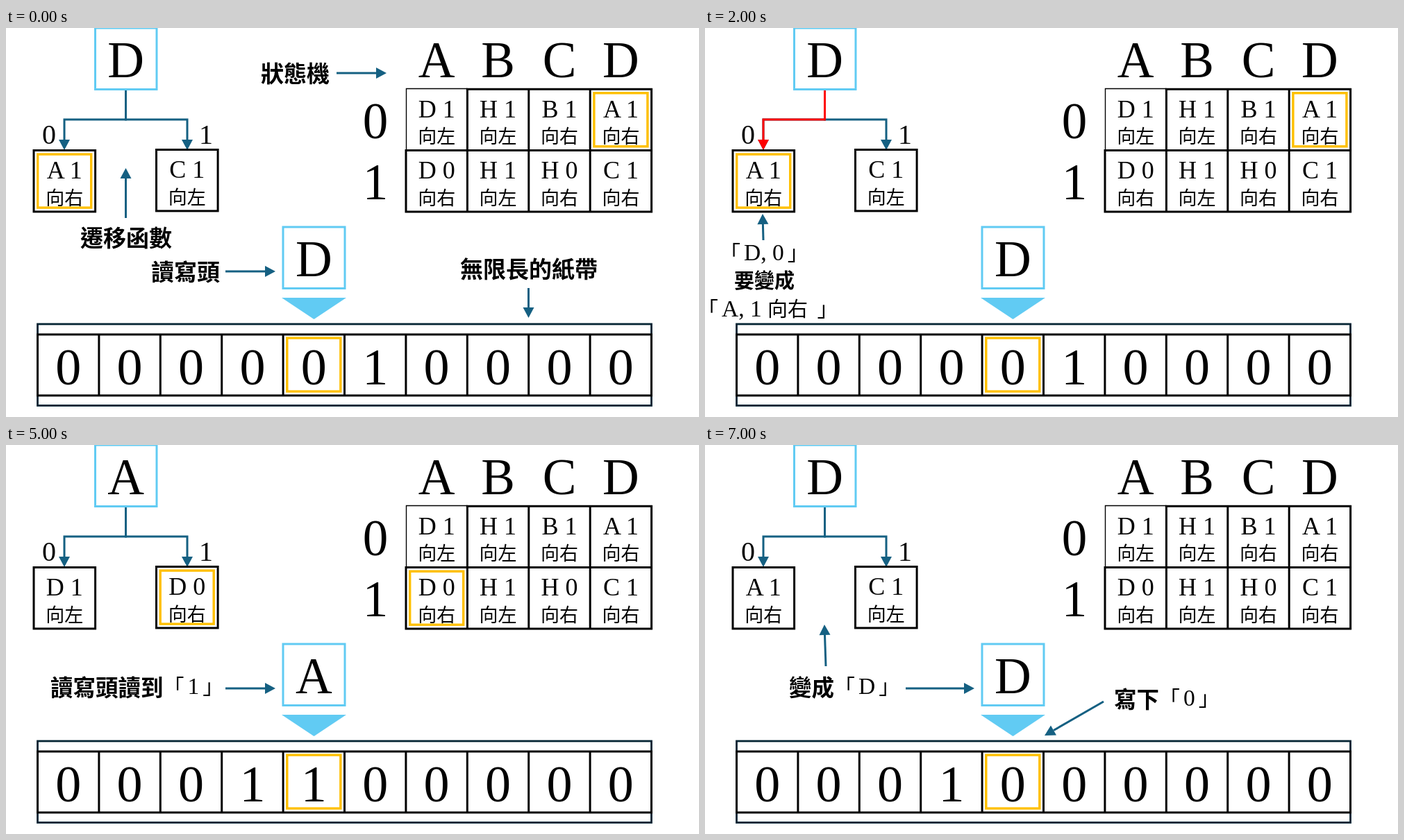
An HTML page that plays this animation: 998x561 px, repeating every 8 s.

```html
<!DOCTYPE html>
<html lang="zh-Hant">
<head>
<meta charset="utf-8">
<style>
  html, body { margin: 0; height: 100%; overflow: hidden; background: #fff; }
  svg { display: block; width: 998px; height: 561px; }
  text {
    font-family: 'Liberation Serif', 'Noto Sans CJK TC', 'Noto Sans CJK', serif;
    white-space: pre;
    text-spacing-trim: space-all;
  }
  .hand { font-family: 'Noto Sans CJK TC', 'Noto Sans CJK', sans-serif; font-weight: 700; }
  .light { font-family: 'Noto Sans CJK TC', 'Noto Sans CJK', sans-serif; font-weight: 300; }
</style>
</head>
<body>
<svg id="stage" viewBox="0 0 998 561"></svg>
<script>
const TEAL = '#156082', SKY = '#61cbf3', GOLD = '#ffc000', RED = '#f00', NAVY = '#042433';
const CELL = 88.4, TABLE_X = 576, TABLE_Y = 88.2, TAPE_X = 45.5;

const text = (x, y, size, s, anchor = 'middle') =>
  `<text x="${x}" y="${y}" font-size="${size}" text-anchor="${anchor}">${s}</text>`;
const light = (s, size, dx = 0) => `<tspan class="light" font-size="${size}" dx="${dx}">${s}</tspan>`;
const hand = (x, midY, s, size = 33) =>
  `<text class="hand" x="${x}" y="${midY + size * 0.38}" font-size="${size}">${s}</text>`;
const box = (x, y, w, h, color, width = 3) =>
  `<rect x="${x}" y="${y}" width="${w}" height="${h}" fill="none" stroke="${color}" stroke-width="${width}"/>`;
const path = (d, color = '#000', width = 3) =>
  `<path d="${d}" fill="none" stroke="${color}" stroke-width="${width}"/>`;
const gold = (x, y) => box(x + 5.7, y + 5.6, 77, 77, GOLD, 3.4);

// Polyline through [x, y] points, ending in a solid arrowhead.
function arrow(points, color = TEAL) {
  const [[px, py], [x, y]] = points.slice(-2);
  const len = Math.hypot(x - px, y - py), ux = (x - px) / len, uy = (y - py) / len;
  const bx = x - ux * 15, by = y - uy * 15;
  const shaft = [...points.slice(0, -1), [bx, by]];
  return path('M' + shaft.join('L'), color) +
    `<path d="M${x} ${y}L${bx - uy * 8} ${by + ux * 8}L${bx + uy * 8} ${by - ux * 8}z" fill="${color}"/>`;
}

const rule = (x, y, symbols, move) =>
  text(x + 44.2, y + 40.6, 36, symbols) + text(x + 44.2, y + 78, 27, light(move, 27));

// Text in corner brackets; brackets and Chinese are set smaller than Latin.
const quoted = (x, y, s, move = '') => text(x, y, 33.5,
  light('「', 30) + `<tspan dx="5">${s}</tspan>` + (move && ` ${light(move, 29)} `) + light('」', 30, 5), 'start');
const phrase = (x, midY, words, s) =>
  hand(x, midY, words, 32.5) + quoted(x + words.length * 32.5, midY + 9, s);

function table() {
  const rows = [
    [['D 1', '向左'], ['H 1', '向左'], ['B 1', '向右'], ['A 1', '向右']],
    [['D 0', '向右'], ['H 1', '向左'], ['H 0', '向右'], ['C 1', '向右']]
  ];
  const right = TABLE_X + 4 * CELL, bottom = TABLE_Y + 2 * CELL, mid = TABLE_Y + CELL;
  let out = [...'ABCD'].map((c, i) => text(TABLE_X + CELL * (i + 0.5), 71, 73, c)).join('');
  rows.forEach((row, r) => {
    out += text(532, 159 + r * CELL, 73, r);
    row.forEach((cell, c) => out += rule(TABLE_X + c * CELL, TABLE_Y + r * CELL, ...cell));
  });
  out += path(`M${TABLE_X + 0.5} ${mid}V87.5H${TABLE_X + CELL}`, '#000', 1.4);
  out += path(`M${TABLE_X + CELL - 1.5} ${TABLE_Y}H${right}V${bottom}H${TABLE_X}V${mid}H${right}`);
  for (let c = 1; c < 4; c++) out += path(`M${TABLE_X + c * CELL} ${TABLE_Y}V${bottom}`);
  return out;
}

const leaf = i => [40 + i * 176.5, 176.5 - i];

function tree(state, red) {
  const rules = state === 'D'
    ? [['A 1', '向右'], ['C 1', '向左']]
    : [['D 1', '向左'], ['D 0', '向右']];
  const branch = (i, color) =>
    arrow([[172.5, 89], [172.5, 132], [84 + i * 177, 132], [84 + i * 177, 176]], color);
  return branch(0) + branch(1) + (red === undefined ? '' : branch(red, RED)) +
    box(128.5, 0, 88.5, 88.5, SKY) + text(172.5, 71, 73, state) +
    text(62, 167, 40, 0) + text(288, 167, 40, 1) +
    rules.map((r, i) => box(...leaf(i), 88.6, 88.4, '#000') + rule(...leaf(i), ...r)).join('');
}

function tape(digits) {
  let out = box(TAPE_X, 427, 10 * CELL, 117.5, NAVY, 2.8) + box(TAPE_X, 442, 10 * CELL, 88, '#000');
  [...digits].forEach((d, i) => {
    const x = TAPE_X + i * CELL;
    out += text(x + CELL / 2, 513.5, 74, d);
    if (i) out += path(`M${x} 442V530`);
  });
  return out;
}

const head = state => box(399, 287, 89, 88.5, SKY) + text(443.3, 358, 73, state) +
  `<path d="M397 389H490L443.5 420z" fill="${SKY}"/>`;

const headArrow = (from = 316) => arrow([[from, 351], [388, 351]]);

const labels = hand(367, 65, '狀態機') + arrow([[476, 65], [548, 65]]) +
  hand(107, 302, '遷移函數') + arrow([[172.5, 274], [172.5, 202]]) +
  hand(209, 351, '讀寫頭') + headArrow() +
  hand(654, 347, '無限長的紙帶') + arrow([[752.5, 375], [752.5, 418]]);

const becomes = (dx, dy, now, next) =>
  arrow([[84 + dx, 306 + dy], [83 + dx, 268 + dy]]) +
  quoted(21 + dx, 335 + dy, now) + hand(42 + dx, 364 + dy, '要變成', 29) +
  quoted(-11 + dx, 416 + dy, next, '向右');

const written = (state, digit) =>
  phrase(121, 350, '變成', state) + arrow([[174, 319], [172, 259]]) + headArrow(289) +
  phrase(589, 367, '寫下', digit) + arrow([[574, 370], [489, 419]]);

const shifted = hand(142, 350, '讀寫頭向右') + headArrow() + arrow([[486, 434], [311, 434]], RED);

const tapeGold = gold(TAPE_X + 4 * CELL, 441.5);
const goldD0 = tapeGold + gold(...leaf(0)) + gold(TABLE_X + 3 * CELL, TABLE_Y);
const goldA1 = tapeGold + gold(...leaf(1)) + gold(TABLE_X, TABLE_Y + CELL);

const scene = (state, digits, extra, red) =>
  table() + tree(state, red) + tape(digits) + head(state) + extra;

// One scene per second.
const scenes = [
  scene('D', '0000010000', goldD0 + labels),
  scene('D', '0000010000', goldD0 + phrase(96, 350, '讀寫頭讀', '0') + headArrow()),
  scene('D', '0000010000', goldD0 + becomes(0, 0, 'D, 0', 'A, 1'), 0),
  scene('A', '0000110000', tapeGold + written('A', '1')),
  scene('A', '0001100000', shifted),
  scene('A', '0001100000', goldA1 + phrase(64, 350, '讀寫頭讀到', '1') + headArrow()),
  scene('A', '0001100000', goldA1 + becomes(177, 3, 'A, 1', 'D, 0'), 1),
  scene('D', '0001000000', tapeGold + written('D', '0'))
];

const stage = document.getElementById('stage');
let shown = -1;
function draw() {
  const step = Math.floor(performance.now() / 1000) % scenes.length;
  if (step !== shown) stage.innerHTML = scenes[shown = step];
  requestAnimationFrame(draw);
}
draw();
</script>
</body>
</html>
```
